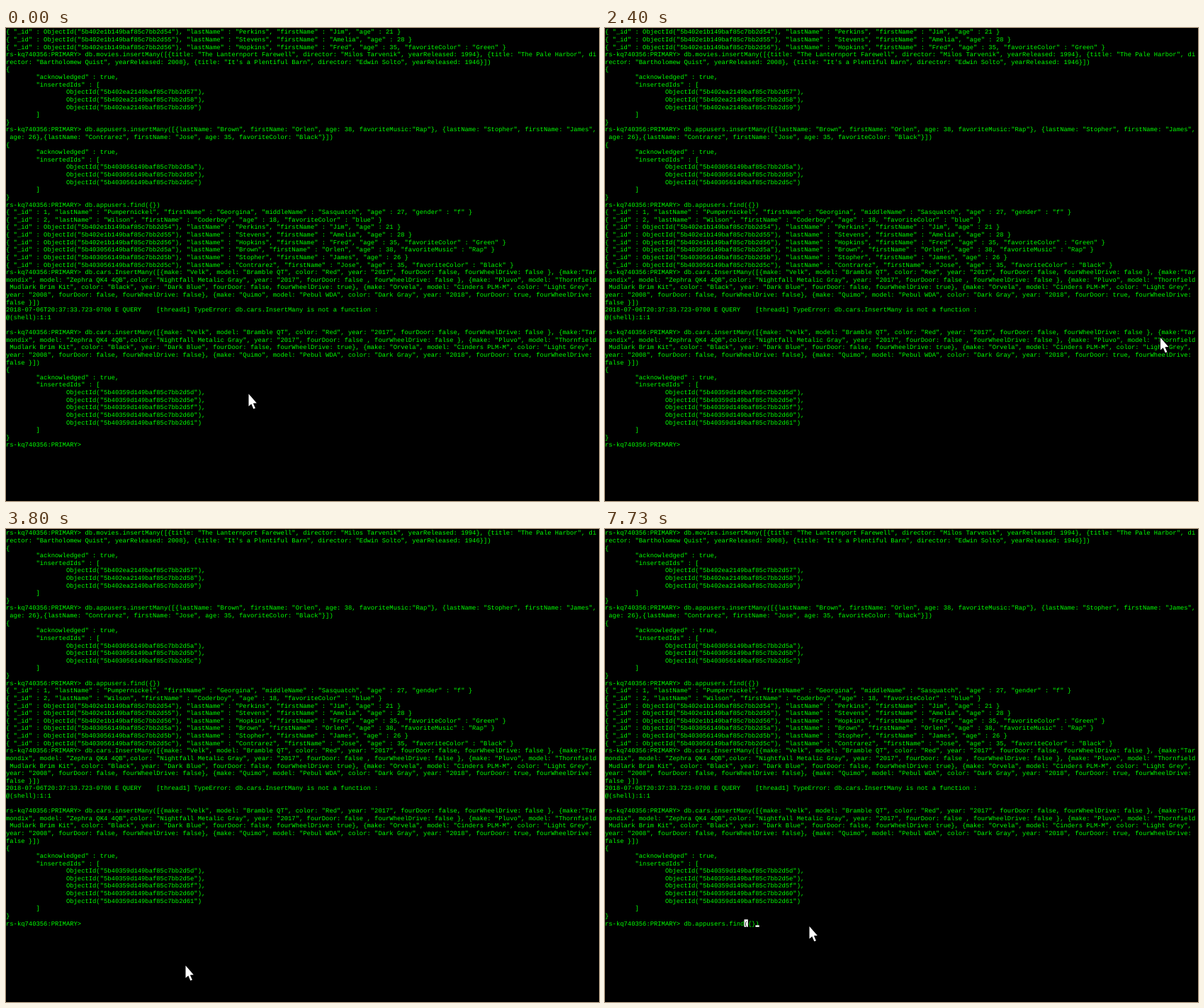
These frames come from a looping animation (837 by 669 pixels, 8 s). An HTML page:

```html
<!DOCTYPE html>
<html lang="en">
<head>
<meta charset="utf-8">
<title>Shell session</title>
<style>
  html, body { margin: 0; width: 100%; height: 100%; overflow: hidden; background: #000; }
  svg { display: block; width: 837px; height: 669px; }
  text {
    font: 8.85px "Liberation Mono", "Courier New", monospace;
    fill: #0f0;
    white-space: pre;
    text-rendering: geometricPrecision;
  }
</style>
</head>
<body>
<svg viewBox="0 0 837 669">
  <g id="screen">
    <g id="log"></g>
    <g id="input"></g>
    <rect id="caret" width="5.3" height="2.4" fill="#fff"/>
    <g id="match">
      <rect width="5.3" height="10.6" fill="#fff"/>
      <text y="8.3" style="fill:#000">(</text>
    </g>
  </g>
  <path id="pointer" d="M0 0V17.6L3.8 14.2L6.8 21.3L9.4 20.2L6.4 13.2L11.3 12.9Z"
    fill="#fff" stroke="#000" stroke-width="1.6" paint-order="stroke"/>
</svg>
<script>
const CELL = 5.31, ROW = 10.62, BASE = 8.3, COLUMNS = 157;
const LOOP = 8000, FPS = 15, SCROLL_ROWS = 3;
const PROMPT = 'rs-kq740356:PRIMARY> ';
const $ = id => document.getElementById(id);

const oid = (head, tail) => `ObjectId("${head}149baf85c7bb2d${tail}")`;

const inserted = (head, tails) => [
  '{',
  '        "acknowledged" : true,',
  '        "insertedIds" : [',
  ...tails.map((tail, i) => ' '.repeat(16) + oid(head, tail) + (i < tails.length - 1 ? ',' : '')),
  '        ]',
  '}'
];

const person = (id, last, first, rest) =>
  `{ "_id" : ${id}, "lastName" : "${last}", "firstName" : "${first}", ${rest} }`;

const carsCommand = method => `db.cars.${method}([` + [
  '{make: "Velk", model: "Bramble QT", color: "Red", year: "2017", fourDoor: false, fourWheelDrive: false }',
  '{make:"Tarmondix", model: "Zephra QK4 4QB",color: "Nightfall Metalic Gray", year: "2017", fourDoor: false , fourWheelDrive: false }',
  '{make: "Pluvo", model: "Thornfield Mudlark Brim Kit", color: "Black", year: "Dark Blue", fourDoor: false, fourWheelDrive: true}',
  '{make: "Orvela", model: "Cinders PLM-M", color: "Light Grey", year: "2008", fourDoor: false, fourWheelDrive: false}',
  '{make: "Quimo", model: "Pebul WDA", color: "Dark Gray", year: "2018", fourDoor: true, fourWheelDrive: false }'
].join(', ') + '])';

const FIND = 'db.appusers.find({})';
const firstUsers = [
  person(oid('5b402e1b', '54'), 'Perkins', 'Jim', '"age" : 21'),
  person(oid('5b402e1b', '55'), 'Stevens', 'Amelia', '"age" : 28'),
  person(oid('5b402e1b', '56'), 'Hopkins', 'Fred', '"age" : 35, "favoriteColor" : "Green"')
];

const history = [
  ...firstUsers,
  PROMPT + 'db.movies.insertMany([{title: "The Lanternport Farewell", director: "Milos Tarvenik", yearReleased: 1994}, ' +
    '{title: "The Pale Harbor", director: "Bartholomew Quist", yearReleased: 2008}, ' +
    '{title: "It\'s a Plentiful Barn", director: "Edwin Solto", yearReleased: 1946}])',
  ...inserted('5b402ea2', ['57', '58', '59']),
  PROMPT + 'db.appusers.insertMany([{lastName: "Brown", firstName: "Orlen", age: 38, favoriteMusic:"Rap"}, ' +
    '{lastName: "Stopher", firstName: "James", age: 26},{lastName: "Contrarez", firstName: "Jose", age: 35, favoriteColor: "Black"}])',
  ...inserted('5b403056', ['5a', '5b', '5c']),
  PROMPT + FIND,
  person(1, 'Pumpernickel', 'Georgina', '"middleName" : "Sasquatch", "age" : 27, "gender" : "f"'),
  person(2, 'Wilson', 'Coderboy', '"age" : 18, "favoriteColor" : "blue"'),
  ...firstUsers,
  person(oid('5b403056', '5a'), 'Brown', 'Orlen', '"age" : 38, "favoriteMusic" : "Rap"'),
  person(oid('5b403056', '5b'), 'Stopher', 'James', '"age" : 26'),
  person(oid('5b403056', '5c'), 'Contrarez', 'Jose', '"age" : 35, "favoriteColor" : "Black"'),
  PROMPT + carsCommand('InsertMany'),
  '2018-07-06T20:37:33.723-0700 E QUERY    [thread1] TypeError: db.cars.InsertMany is not a function :',
  '@(shell):1:1',
  '',
  PROMPT + carsCommand('insertMany'),
  ...inserted('5b40359d', ['5d', '5e', '5f', '60', '61'])
];

const wrap = line => line.match(new RegExp(`.{1,${COLUMNS}}`, 'g')) || [''];

function print(group, lines, firstRow) {
  const rows = lines.flatMap(wrap);
  group.replaceChildren(...rows.map((row, i) => {
    const text = document.createElementNS('http://www.w3.org/2000/svg', 'text');
    text.setAttribute('y', (firstRow + i) * ROW + BASE);
    text.textContent = row;
    return text;
  }));
  return rows.length;
}

const move = (node, x, y) => node.setAttribute('transform', `translate(${x} ${y})`);

// Ticks are fifteenths of a second: [tick, x, y]
const pointerPath = [
  [6, 342.5, 517.5], [8, 333, 516], [9, 333, 516], [14, 323.5, 511],
  [17, 323.5, 511], [18, 323, 510], [28, 323, 510], [32, 520, 476],
  [36, 784, 438], [38, 812, 442], [39, 812, 442], [42, 700, 335],
  [44, 540, 303], [48, 84, 470], [52, 235, 639], [56, 255, 619],
  [57, 253.5, 617.5], [62, 116, 562], [65, 116, 562], [70, 288.5, 562]
];
const typed = [
  [0, ''], [94, carsCommand('insertMany')], [101, carsCommand('InsertMany')],
  [105, ''], [106, FIND]
];
const scrolled = [[14, 17], [57, 120]];
const caretOn = [[73, 81], [89, 97], [101, 113], [116, 120]];

const within = (spans, tick) => spans.some(([from, to]) => tick >= from && tick < to);

function pointerAt(tick) {
  const next = pointerPath.findIndex(key => key[0] > tick);
  if (next < 0) return pointerPath.at(-1).slice(1);
  if (next === 0) return pointerPath[0].slice(1);
  const [t0, x0, y0] = pointerPath[next - 1];
  const [t1, x1, y1] = pointerPath[next];
  const k = (tick - t0) / (t1 - t0);
  return [x0 + (x1 - x0) * k, y0 + (y1 - y0) * k];
}

const inputRow = print($('log'), history, 0);
let shown = null;

function draw(time) {
  const tick = Math.floor((time + 4) % LOOP * FPS / 1000);
  const line = PROMPT + typed.findLast(([from]) => from <= tick)[1];
  if (line !== shown) {
    print($('input'), [line], inputRow);
    shown = line;
  }

  const matching = tick >= 116;
  const caret = line.length - (matching ? 1 : 0);
  const caretRow = inputRow + Math.floor(caret / COLUMNS);
  move($('caret'), caret % COLUMNS * CELL, caretRow * ROW + 8.2);
  $('caret').style.display = within(caretOn, tick) ? '' : 'none';

  move($('match'), line.lastIndexOf('(') * CELL, inputRow * ROW);
  $('match').style.display = matching ? '' : 'none';

  move($('screen'), 0, within(scrolled, tick) ? -SCROLL_ROWS * ROW : 0);
  move($('pointer'), ...pointerAt(tick));
}

const start = performance.now();
function loop() {
  draw(performance.now() - start);
  requestAnimationFrame(loop);
}
loop();
</script>
</body>
</html>
```
